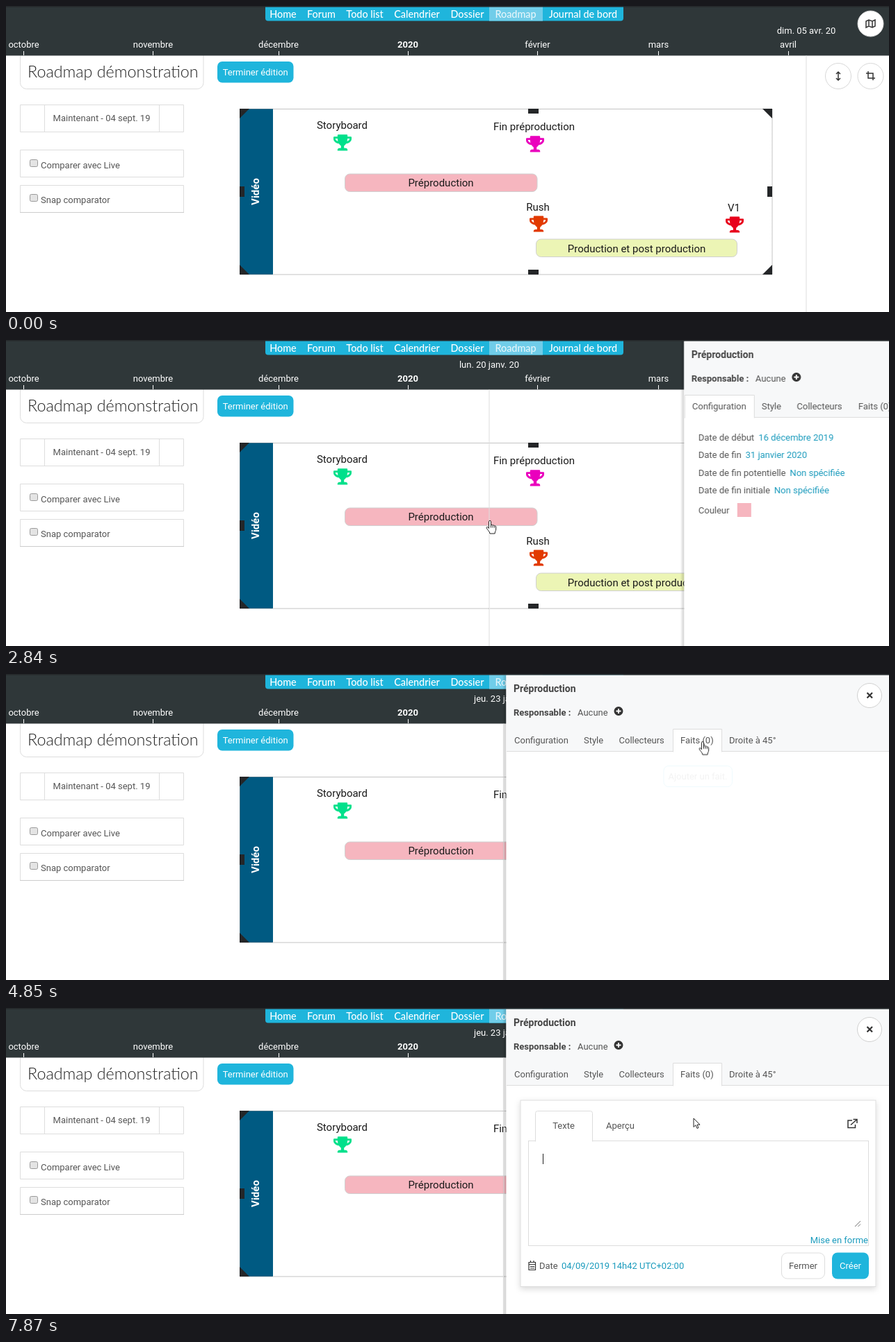
Recreate the animation shown at these times as an HTML page. Size 1270x441 px, loop 8000 ms.

```html
<!DOCTYPE html>
<html lang="fr">
<head>
<meta charset="utf-8">
<title>Roadmap</title>
<style>
html, body { margin: 0; width: 100%; height: 100%; overflow: hidden; background: #fff; }
svg { display: block; }
text { font: 13px Roboto, sans-serif; fill: #555; white-space: pre; }
.mid { text-anchor: middle; }
.w text, text.w { fill: #fff; }
.nav text { font: 500 14.4px Lato, sans-serif; fill: #fff; text-anchor: middle; }
.label text { font-size: 15px; fill: #1a1a1a; text-anchor: middle; }
.title { font: 300 23.3px Lato, sans-serif; fill: #222; }
.b { font-weight: 700; }
.link { fill: #1a9bbd; }
.box { fill: #fff; stroke: #ddd; }
.icon { fill: none; stroke: #333; stroke-width: 1.5; }

.anim { animation: 8s linear infinite; }
#trail { animation-name: trail; }
#rule { animation-name: rule; animation-timing-function: step-end; }
#panel { animation-name: panel; }
#config { animation-name: config; }
#fact { animation-name: fact; }
#hover { animation-name: hover; animation-timing-function: step-end; }
#tab1 { animation-name: tab1; animation-timing-function: step-end; }
#tab2 { animation-name: tab2; animation-timing-function: step-end; }
#form { animation-name: form; }
#caret { animation-name: caret; animation-timing-function: step-end; }
#cursor { animation-name: cursor; }
#arrow { animation-name: arrow; animation-timing-function: step-end; }
#hand { animation-name: hand; animation-timing-function: step-end; }
#beam { animation-name: beam; animation-timing-function: step-end; }

@keyframes trail {
  0%, 10.5% { transform: translateX(1151px); animation-timing-function: cubic-bezier(.4, 0, .8, .85); }
  16.75% { transform: translateX(772.5px); animation-timing-function: ease-out; }
  19.75%, 40.75% { transform: translateX(695px); }
  42.5%, 100% { transform: translateX(716px); }
}
@keyframes rule { 0%, 19.75% { stroke: #ddd } 10.5% { stroke: #a0a0a0 } 100% { stroke: #ddd } }
@keyframes panel {
  0%, 32.24% { transform: translateX(550px); opacity: 0; }
  32.25% { transform: translateX(550px); opacity: 1; animation-timing-function: cubic-bezier(.37, 0, .63, 1); }
  38.5%, 100% { transform: none; opacity: 1; }
}
@keyframes config { 0%, 58.625% { opacity: 1 } 60.5%, 100% { opacity: 0 } }
@keyframes fact { 0%, 60.5% { opacity: 0 } 62.375%, 98.2% { opacity: 1 } 98.3%, 100% { opacity: 0 } }
@keyframes hover { 0% { fill: #fff } 71%, 100% { fill: #f4fafc } }
@keyframes tab1 { 0% { opacity: 1 } 58.625%, 100% { opacity: 0 } }
@keyframes tab2 { 0% { opacity: 0 } 58.625%, 100% { opacity: 1 } }
@keyframes form {
  0%, 93.62% { transform: translateY(308px); opacity: 0; }
  93.625% { transform: translateY(308px); opacity: 1; animation-timing-function: cubic-bezier(.37, 0, .63, 1); }
  98.375%, 100% { transform: none; opacity: 1; }
}
@keyframes caret { 0% { opacity: 0 } 98.2%, 100% { opacity: 1 } }
@keyframes cursor {
  0%, 10.5% { transform: translate(1151px, 460px); animation-timing-function: cubic-bezier(.4, 0, .8, .85); }
  16.75% { transform: translate(771px, 291px); animation-timing-function: ease-out; }
  19.75%, 40.75% { transform: translate(696px, 261px); }
  42.5% { transform: translate(716px, 260px); }
  47.375% { transform: translate(887px, 229px); }
  50.5% { transform: translate(970px, 139px); animation-timing-function: ease-out; }
  55.125%, 58.625% { transform: translate(1004px, 95px); }
  62.375%, 66.375% { transform: translate(1000px, 101px); animation-timing-function: ease-in-out; }
  74.25%, 77.375% { transform: translate(989px, 146px); animation-timing-function: ease-in-out; }
  81.75% { transform: translate(989px, 161px); animation-timing-function: ease-in-out; }
  86.125% { transform: translate(989px, 149px); animation-timing-function: step-end; }
  88.375% { transform: translate(984px, 149px); animation-timing-function: step-end; }
  90.375% { transform: translate(989px, 149px); animation-timing-function: step-end; }
  94.125%, 100% { transform: translate(989px, 159px); }
}
@keyframes arrow {
  0%, 17.25%, 41.75%, 67.5%, 97.25%, 100% { opacity: 1 }
  16.25%, 23.75%, 53.5%, 71% { opacity: 0 }
}
@keyframes hand {
  0%, 41.75%, 67.5%, 97.25%, 100% { opacity: 0 }
  23.75%, 53.5%, 71% { opacity: 1 }
}
@keyframes beam { 0%, 17.25%, 100% { opacity: 0 } 16.25% { opacity: 1 } }
</style>
</head>
<body>
<svg width="1270" height="441" viewBox="0 0 1270 441">
  <defs>
    <path id="cup" fill-rule="evenodd" d="M25 2.9H20.2V1.1A1.1 1.1 0 0 0 19.1 0H6.9A1.1 1.1 0 0 0 5.8 1.1V2.9H1.1A1.1 1.1 0 0 0 0 4V6.5C0 8.1 1 9.8 2.8 11.1 4.2 12.1 6 12.8 7.8 13 9.2 15.2 10.8 16.2 10.8 16.2V19.5H8.7C7.1 19.5 5.8 20.4 5.8 22V23.1H20.2V22C20.2 20.4 18.9 19.5 17.3 19.5H15.2V16.2S16.8 15.2 18.2 13C20 12.8 21.8 12.1 23.2 11.1 25 9.8 26 8.1 26 6.5V4A1.1 1.1 0 0 0 25 2.9ZM4.5 8.7C3.4 7.9 2.9 7 2.9 6.5V5.8H5.8C5.8 7.2 6.1 8.5 6.4 9.7 5.7 9.4 5.1 9.1 4.5 8.7ZM21.5 8.7C22.6 7.9 23.1 7 23.1 6.5V5.8H20.2C20.2 7.2 19.9 8.5 19.6 9.7 20.3 9.4 20.9 9.1 21.5 8.7Z"/>
    <path id="corner" d="M0 0H14L0 14Z"/>
    <linearGradient id="shade">
      <stop offset="0" stop-color="#000" stop-opacity="0"/>
      <stop offset="1" stop-color="#000" stop-opacity=".2"/>
    </linearGradient>
    <filter id="lift" x="-5%" y="-5%" width="110%" height="115%">
      <feDropShadow dx="0" dy="3" stdDeviation="4" flood-opacity=".15"/>
    </filter>
  </defs>
  <rect width="1270" height="441" fill="#fff"/>

  <!-- sidebar -->
  <rect class="box" x="20.5" y="50.5" width="263.5" height="69" rx="9"/>
  <text class="title" x="31" y="103">Roadmap démonstration</text>
  <rect x="304" y="80" width="109.5" height="30.5" rx="7" fill="#1fb5dc"/>
  <text class="w mid" x="358.7" y="99.5">Terminer édition</text>
  <path class="box" d="M20.5 142.5H255.5V181.5H20.5ZM55.5 142.5V181.5M220.5 142.5V181.5M20.5 207.5H255.5V246.5H20.5ZM20.5 258.5H255.5V297.5H20.5Z"/>
  <path d="M20 297.5H256" stroke="#ccc"/>
  <text class="mid" x="137.5" y="166">Maintenant - 04 sept. 19</text>
  <g fill="#e4e4e4" stroke="#999">
    <rect x="34.5" y="221.5" width="11" height="10" rx="2"/>
    <rect x="34.5" y="271.5" width="11" height="10" rx="2"/>
  </g>
  <text x="50" y="233.5">Comparer avec Live</text>
  <text x="50" y="284">Snap comparator</text>

  <!-- group -->
  <rect x="336" y="148" width="48" height="239" fill="#005a82"/>
  <rect x="336.5" y="148.5" width="765.5" height="238.5" fill="none" stroke="#888" stroke-dasharray="1 1"/>
  <text class="w mid b" transform="translate(364 267.5) rotate(-90)" style="font-size:15px">Vidéo</text>
  <g fill="#242628">
    <use href="#corner" x="336" y="148"/>
    <use href="#corner" transform="translate(1102 148) scale(-1 1)"/>
    <use href="#corner" transform="translate(336 387) scale(1 -1)"/>
    <use href="#corner" transform="translate(1102 387) scale(-1)"/>
    <path d="M751 148h15v7h-15zM751 380h15v7h-15zM336 260h7v15h-7zM1095 260h7v15h-7z"/>
  </g>
  <g stroke="#d0d0d0">
    <rect x="487.5" y="242" width="276.5" height="25.5" rx="7" fill="#f6b6bf"/>
    <rect x="762.5" y="336" width="289" height="25.5" rx="7" fill="#ecf5b5"/>
  </g>
  <use href="#cup" x="471" y="185.3" fill="#00e08b"/>
  <use href="#cup" x="748" y="187.3" fill="#ea00bd"/>
  <use href="#cup" x="753" y="302.5" fill="#e23a00"/>
  <use href="#cup" x="1035" y="303.5" fill="#e8001c"/>
  <g class="label">
    <text x="483.5" y="177">Storyboard</text>
    <text x="759.5" y="179">Fin préproduction</text>
    <text x="625.5" y="260">Préproduction</text>
    <text x="765" y="295">Rush</text>
    <text x="1047" y="295.5">V1</text>
    <text x="907" y="354.5">Production et post production</text>
  </g>

  <!-- header -->
  <rect width="1270" height="71.5" fill="#2f3739"/>
  <path d="M373 0H888V17.5a4 4 0 0 1-4 4H377a4 4 0 0 1-4-4Z" fill="#1fb5dc"/>
  <rect x="695" width="77" height="21.5" fill="#70cde9"/>
  <g class="nav">
    <text x="398.5" y="17">Home</text>
    <text x="453.5" y="17">Forum</text>
    <text x="516" y="17">Todo list</text>
    <text x="591" y="17">Calendrier</text>
    <text x="663.5" y="17">Dossier</text>
    <text x="733" y="17" style="fill:#e6f6fb">Roadmap</text>
    <text x="830" y="17">Journal de bord</text>
  </g>
  <g class="w mid">
    <text x="25.5" y="60">octobre</text>
    <text x="211.5" y="60">novembre</text>
    <text x="392" y="60">décembre</text>
    <text x="578" y="60" class="b">2020</text>
    <text x="764.5" y="60">février</text>
    <text x="938.5" y="60">mars</text>
    <text x="1125" y="60">avril</text>
  </g>
  <path d="M25.5 65V71M211.5 65V71M392.5 65V71M578.5 65V71M764.5 65V71M938.5 65V71M1125.5 65V71" stroke="#fff"/>
  <g fill="#fff" stroke="#d8d8d8">
    <circle cx="1243.5" cy="25.5" r="18.5"/>
    <circle cx="1197" cy="101" r="18.5"/>
    <circle cx="1243.5" cy="101" r="18.5"/>
  </g>
  <path class="icon" d="M1237 22L1241 20 1246 22 1250 20V29L1246 31 1241 29 1237 31ZM1241 20V29M1246 22V31"/>
  <path class="icon" d="M1197 96V106M1194 98L1197 95 1200 98M1194 104L1197 107 1200 104"/>
  <path class="icon" d="M1240 94V104H1250M1237 97H1247V107"/>

  <g id="trail" class="anim">
    <path id="rule" class="anim" d="M0 71.5V441"/>
    <text id="day" class="w mid" y="40">dim. 05 avr. 20</text>
  </g>

  <!-- side panel -->
  <g id="panel" class="anim">
    <rect x="714" y="2" width="5.5" height="439" fill="url(#shade)"/>
    <rect x="719.5" y="1.5" width="551" height="440" fill="#fff"/>
    <rect x="719.5" y="1.5" width="551" height="110" fill="#f7f8f9"/>
    <path d="M720 111.5H1270" stroke="#ddd"/>
    <text class="b" x="730" y="25.5" style="font-size:14px;fill:#444">Préproduction</text>
    <text class="b" x="730" y="59.5" style="fill:#444">Responsable :</text>
    <text x="822" y="59.5">Aucune</text>
    <circle cx="881" cy="53.5" r="6.5" fill="#333"/>
    <path d="M877.5 53.5H884.5M881 50V57" stroke="#fff" stroke-width="1.8"/>
    <circle cx="1242" cy="31" r="17.5" fill="#fff" stroke="#d0d0d0"/>
    <path d="M1238.5 27L1246 34.5M1246 27L1238.5 34.5" stroke="#333" stroke-width="2.2"/>
    <path id="tab1" class="box anim" d="M720.5 112.5V79.5H820.5V112.5"/>
    <path id="tab2" class="box anim" d="M959.5 112.5V79.5H1029.5V112.5"/>
    <text x="731" y="99.5">Configuration</text>
    <text x="831" y="99.5">Style</text>
    <text x="881.5" y="99.5">Collecteurs</text>
    <text x="970" y="99.5">Faits (0)</text>
    <text x="1040" y="99.5">Droite à 45°</text>

    <g id="config" class="anim">
      <text x="740" y="144.5">Date de début<tspan class="link" dx="6">16 décembre 2019</tspan></text>
      <text x="740" y="170">Date de fin<tspan class="link" dx="6">31 janvier 2020</tspan></text>
      <text x="740" y="195.5">Date de fin potentielle<tspan class="link" dx="6">Non spécifiée</tspan></text>
      <text x="740" y="221">Date de fin initiale<tspan class="link" dx="6">Non spécifiée</tspan></text>
      <text x="740" y="249.5">Couleur</text>
      <rect x="796" y="235" width="20" height="20" fill="#f6b6bf"/>
    </g>

    <g id="fact" class="anim">
      <rect id="hover" class="anim" x="946" y="132.5" width="98.5" height="30" rx="7" stroke="#1fb5dc"/>
      <text class="mid" x="995" y="151.5">Ajouter un fait.</text>
    </g>

    <g id="form" class="anim">
      <rect class="box" x="740" y="133" width="511" height="268.5" filter="url(#lift)"/>
      <rect class="box" x="751.5" y="191.5" width="489" height="151"/>
      <path class="box" d="M761.5 192.5V151.5a3 3 0 0 1 3-3H840.5a3 3 0 0 1 3 3V192.5"/>
      <text class="mid" x="802" y="174">Texte</text>
      <text x="863" y="174">Aperçu</text>
      <path class="icon" d="M1217 162H1211V172.5H1221.5V168M1215 168.5L1224 160.5M1218.5 160.5H1224V166"/>
      <path id="caret" class="anim" d="M772.5 210V225" stroke="#222"/>
      <path d="M1221 315L1229 307M1225.5 315L1229 311.5" stroke="#777"/>
      <text class="link" x="1240" y="338.5" text-anchor="end">Mise en forme</text>
      <path class="icon" d="M752 366.5H761.5V377.5H752ZM752 369.5H761.5M754.5 364V367M759 364V367M754 372.5H760M754 375H760" style="stroke-width:1.2"/>
      <text x="767" y="376">Date<tspan class="link" x="799">04/09/2019 14h42 UTC+02:00</tspan></text>
      <rect class="box" x="1115.5" y="353" width="62" height="37" rx="8"/>
      <text class="mid" x="1146.5" y="376">Fermer</text>
      <rect x="1188" y="352.5" width="53" height="38" rx="8" fill="#1fb5dc"/>
      <text class="w mid" x="1214.5" y="376">Créer</text>
    </g>
  </g>
  <rect width="1270" height="1.5" fill="#25292b"/>

  <g id="cursor" class="anim">
    <path id="arrow" class="anim" d="M0 0V12.5L2.9 9.8 5 14.5 7 13.6 5 9.2H9Z" fill="#fff" stroke="#222"/>
    <path id="hand" class="anim" d="M-1.5 10.5V.8a1.5 1.5 0 0 1 3 0V6a1.4 1.4 0 0 1 2.6.4a1.4 1.4 0 0 1 2.5.7a1.3 1.3 0 0 1 2.1 1V12c0 2-1.6 3-1.6 6H0C0 15-4.8 11.5-4.8 9.5c0-1.6 2-1.6 3.3 1ZM1.5 6V9.5M4.1 6.5V9.5M6.6 7.5V9.5" fill="#fff" stroke="#222"/>
    <path id="beam" class="anim" d="M-3-7H-1L0-6 1-7H3M0-6V6M-3 7H-1L0 6 1 7H3" fill="none" stroke="#222"/>
  </g>
</svg>
<script>
const trail = document.getElementById('trail');
const day = document.getElementById('day');
const days = ['dim.', 'lun.', 'mar.', 'mer.', 'jeu.', 'ven.', 'sam.'];
const months = ['janv.', 'févr.', 'mars', 'avr.'];
const NEW_YEAR_X = 578, DAY_WIDTH = 6.02;

// The label reads the date under the moving rule.
function update() {
  const x = new DOMMatrix(getComputedStyle(trail).transform).e;
  const date = new Date(Date.UTC(2020, 0, 1 + Math.floor((x - NEW_YEAR_X) / DAY_WIDTH)));
  const number = String(date.getUTCDate()).padStart(2, '0');
  const text = `${days[date.getUTCDay()]} ${number} ${months[date.getUTCMonth()]} 20`;
  if (day.textContent !== text) day.textContent = text;
  requestAnimationFrame(update);
}
update();
</script>
</body>
</html>
```
